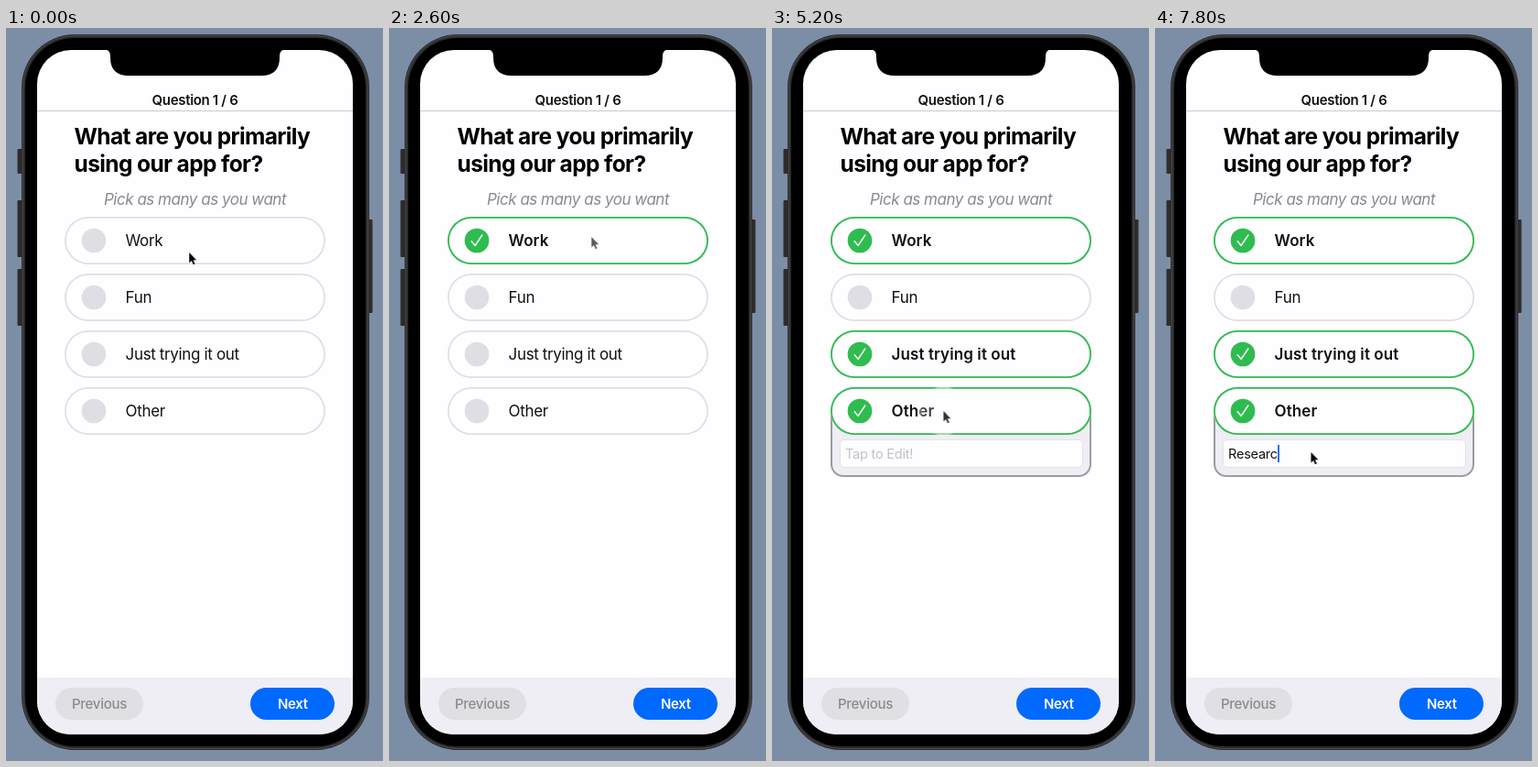
An HTML page for the animation above (8 s loop, 412x800 px).

```html
<!DOCTYPE html>
<html lang="en">
<head>
<meta charset="utf-8">
<title>Survey</title>
<style>
  :root { --green: #2fbc4f; --grey: #dfdee4; --bar: #efeef4; }
  * { box-sizing: border-box; }
  html, body { margin: 0; width: 100%; height: 100%; overflow: hidden; background: #7c8da6; }
  body {
    position: relative;
    font-family: Inter, "Open Sans", sans-serif;
    font-optical-sizing: none;
    color: #111;
    white-space: nowrap;
  }
  svg, div, h1, p, button { position: absolute; margin: 0; }
  .phone { left: 0; top: 0; }

  .title { left: 34px; width: 345px; top: 69px; text-align: center; font: 600 15px/20px Inter, sans-serif; letter-spacing: -.32px; }
  h1 { left: 74.5px; top: 102.5px; color: #000; font: 700 24.5px/30px Inter, sans-serif; letter-spacing: -.61px; }
  .hint { left: 34px; width: 345px; top: 176px; text-align: center; color: #8a8a8e; font: italic 400 17px/22px Inter, sans-serif; letter-spacing: -.48px; }

  .row {
    left: 64px; width: 285px; height: 52px; padding-left: 66.6px;
    border-radius: 26px; background: #fefdff;
    box-shadow: inset 0 0 0 1.7px var(--grey);
    font-size: 17px; line-height: 52px;
    font-weight: calc(400 + 200 * var(--on));
    letter-spacing: calc((.45 * var(--on) - .36) * 1px);
    --on: 0;
  }
  .row::after {
    content: ""; position: absolute; inset: 0;
    box-shadow: inset 0 0 0 1.8px var(--green); border-radius: 26px; opacity: var(--on);
  }
  .row svg { left: 18px; top: 12px; }
  .row g { opacity: var(--on); }

  .panel {
    left: 64px; top: 418px; width: 285px; height: 72px; overflow: hidden;
    border: 2px solid #9d9ba0; border-radius: 0 0 14px 14px; background: var(--bar);
  }
  .field {
    left: 8px; bottom: 8px; width: 266px; height: 31px; padding-left: 5px;
    display: flex; align-items: center;
    border: 1px solid #e3e2e7; border-radius: 5px; background: #fefdff;
    font-size: 14.5px; letter-spacing: -.22px;
  }
  .field span { position: absolute; color: #c1c1c5; }
  .field b { font-weight: 400; }
  .field b::before { content: ""; }
  .field u { width: 2px; height: 19px; background: #2b6fe8; }

  .footer { left: 34px; top: 709px; width: 345px; height: 62px; background: var(--bar); border-radius: 0 0 36px 36px; }
  button {
    top: 11px; height: 35px; padding: 0; border: 0; border-radius: 18px;
    font: 600 15px/35px Inter, sans-serif; letter-spacing: -.25px;
  }
  .prev { left: 20px; width: 96px; background: #dfdfe4; color: #8b8a8e; font-weight: 500; }
  .next { left: 233.4px; width: 92px; background: #0069ff; color: #fff; }

  .cursor { left: 0; top: 0; overflow: visible; }

  .work, .trying, .other, .panel, .field *, .field b::before, .cursor, .ripple { animation: 8s step-end infinite; }
  .work { animation-name: work; }
  .trying { animation-name: trying; }
  .other { animation-name: other; }
  .panel { animation-name: open; }
  .field span { animation-name: empty; }
  .field b::before { animation-name: type; }
  .field u { animation-name: blink; }
  .cursor { animation-name: move; }
  .ripple { animation-name: tap; }

  @keyframes work { 0% { --on: 0 } 32.5%, 100% { --on: 1 } }
  @keyframes trying { 0% { --on: 0 } 50%, 100% { --on: 1 } }
  @keyframes other { 0% { --on: 0 } 62.5%, 100% { --on: 1 } }
  @keyframes open {
    0% { opacity: 0; height: 20px }
    62.5% { opacity: 1; height: 46px }
    65%, 100% { opacity: 1; height: 72px }
  }
  @keyframes empty { 0% { opacity: 1 } 85%, 100% { opacity: 0 } }
  @keyframes type {
    0% { content: "" }
    85% { content: "R" }
    87.5% { content: "Re" }
    90% { content: "Res" }
    92.5% { content: "Rese" }
    95% { content: "Resear" }
    97.5%, 100% { content: "Researc" }
  }
  @keyframes blink {
    0% { opacity: 0 }
    75% { opacity: 1 }
    82.5% { opacity: .35 }
    85%, 100% { opacity: 1 }
  }
  @keyframes move {
    0% { transform: translate(200.2px, 245px) }
    2.5% { transform: translate(200.7px, 245px) }
    12.5% { transform: translate(240px, 350px) }
    15% { transform: translate(281px, 491px) }
    17.5% { transform: translate(268px, 436px) }
    20% { transform: translate(234px, 286px) }
    22.5% { transform: translate(221.3px, 228px) }
    37.5% { transform: translate(219px, 246px) }
    40% { transform: translate(211px, 310px) }
    42.5% { transform: translate(205px, 346px) }
    45% { transform: translate(204.5px, 354px) }
    55% { transform: translate(202px, 366px) }
    57.5% { transform: translate(192px, 405px) }
    60% { transform: translate(187.4px, 418px) }
    67.5% { transform: translate(184px, 428px) }
    70% { transform: translate(174px, 455px) }
    72.5%, 100% { transform: translate(170.5px, 463px) }
  }
  @keyframes tap {
    0%, 37.5%, 55%, 67.5%, 77.5%, 100% { opacity: 0; transform: scale(.5) }
    32.5%, 50%, 62.5%, 72.5% { opacity: .9; transform: scale(.6) }
    35%, 52.5%, 65%, 75% { opacity: .5; transform: none }
  }
</style>
</head>
<body>
<svg class="phone" width="412" height="800">
  <g fill="#2f2c2b">
    <rect x="12.5" y="132" width="6" height="27" rx="1"/>
    <rect x="12.5" y="188" width="6" height="62" rx="1"/>
    <rect x="12.5" y="263" width="6" height="62" rx="1"/>
    <rect x="395" y="209" width="5.5" height="102" rx="1"/>
  </g>
  <rect x="17" y="7" width="380" height="781" rx="58" fill="#2b2b2c"/>
  <rect x="18.5" y="8.5" width="377" height="778" rx="56.5" fill="none" stroke="#4c4b4b"/>
  <rect x="21" y="11" width="372" height="773" rx="54" fill="#000"/>
  <rect x="34" y="24" width="345" height="747" rx="37" fill="#fefdff"/>
  <path d="M107 23Q114 24 114 30V32Q114 52 134 52H279Q299 52 299 32V30Q299 24 306 23Z"/>
  <path d="M34 90.5H379" stroke="#cbcace"/>
</svg>

<div class="title">Question 1 / 6</div>
<h1>What are you primarily<br>using our app for?</h1>
<p class="hint">Pick as many as you want</p>

<div class="panel"><div class="field"><span>Tap to Edit!</span><b></b><u></u></div></div>

<div class="row work" style="top:206px">Work</div>
<div class="row" style="top:268px">Fun</div>
<div class="row trying" style="top:330px">Just trying it out</div>
<div class="row other" style="top:392px">Other</div>

<div class="footer"><button class="prev">Previous</button><button class="next">Next</button></div>

<svg class="cursor" width="1" height="1">
  <path d="M0 0V11.4L2.6 9L4.5 13.2L6.3 12.4L4.4 8.3H7.9Z" stroke="#fff" stroke-width="1.4" stroke-linejoin="round" paint-order="stroke"/>
  <circle class="ripple" r="25.5" fill="#fff" fill-opacity=".4" stroke="#fff" stroke-width="2"/>
</svg>

<script>
  const disc = `<svg width="28" height="28" viewBox="-14 -14 28 28">
    <circle r="13.3" fill="#dfdee4"/>
    <g><circle r="13.3" fill="#2fbc4f"/>
    <path d="M-5.8 .8L-1.8 5.4L5.8 -6" fill="none" stroke="#fff" stroke-width="1.5" stroke-linecap="round" stroke-linejoin="round"/></g>
  </svg>`;
  for (const row of document.querySelectorAll(".row")) row.insertAdjacentHTML("beforeend", disc);
</script>
</body>
</html>
```
